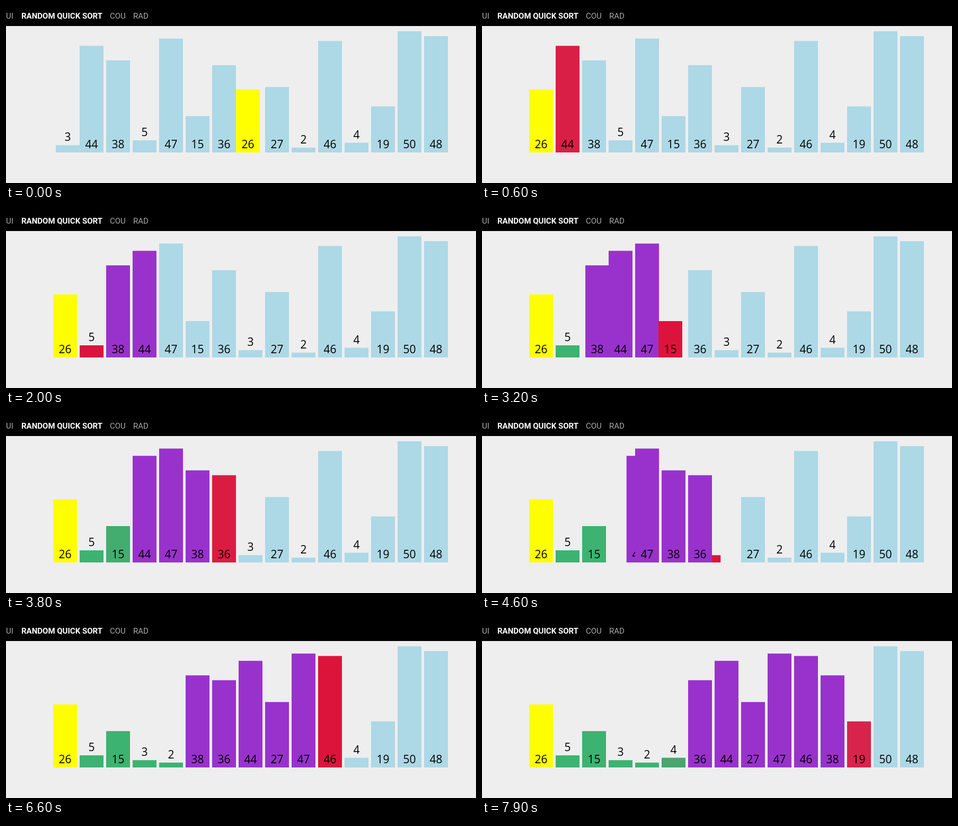
These frames come from a looping animation (887 px wide and 336 px high, 8000 ms). An HTML page:

```html
<!DOCTYPE html>
<html lang="en">
<head>
<meta charset="utf-8">
<title>Random quick sort</title>
<style>
  html, body { margin: 0; width: 100%; height: 100%; overflow: hidden; background: #eee; }
  svg { display: block; }
  .menu { font: 15px Roboto, sans-serif; fill: #aaa; }
  .menu .on { font-weight: bold; fill: #fff; }
  .bar { font: 21px "Open Sans", "Noto Sans", sans-serif; text-anchor: middle; }
</style>
</head>
<body>
<svg id="stage" width="887" height="336" viewBox="0 0 887 336">
  <rect width="887" height="38"/>
  <g class="menu">
    <text x="0" y="24">UI</text>
    <text x="29" y="24" class="on">RANDOM QUICK SORT</text>
    <text x="196" y="24">COU</text>
    <text x="240" y="24">RAD</text>
  </g>
</svg>
<script>
const LOOP = 8000, TICK = 100, MOVE = 250;
const LEFT = 89, PITCH = 50, WIDTH = 45, FLOOR = 278, UNIT = 4.6;
const BLUE = [173, 216, 230], YELLOW = [255, 255, 0], RED = [220, 20, 60],
      PURPLE = [153, 50, 204], GREEN = [60, 179, 113];

const values = [3, 44, 38, 5, 47, 15, 36, 26, 27, 2, 46, 4, 19, 50, 48];
const pivotSlot = 7, pivot = values[pivotSlot], lastSlot = 12;

// Start time of each step, in ms
const starts = [-38, 410, 868, 1317, 1764, 2232, 2694, 3146, 3604,
                4060, 4513, 4970, 5427, 5883, 6342, 6792, 7248, 7718];

function add(parent, name, attrs) {
  const el = document.createElementNS("http://www.w3.org/2000/svg", name);
  for (const key in attrs) el.setAttribute(key, attrs[key]);
  return parent.appendChild(el);
}

const stage = document.getElementById("stage");
const bars = values.map(value => {
  const height = value * UNIT, top = FLOOR - height;
  const group = add(stage, "g", { class: "bar" });
  const rect = add(group, "rect", { y: top, width: WIDTH, height });
  const label = add(group, "text", { x: WIDTH / 2, y: (height < 30 ? top : FLOOR) - 8 });
  label.textContent = value;
  return { value, group, rect };
});

// Run the partition once and record what each step changes
const steps = [];
const order = bars.slice();

function swap(a, b) {
  [order[a], order[b]] = [order[b], order[a]];
  steps.push([a, b].map(i => ({ bar: order[i], key: "slot", to: [i] })));
}

swap(0, pivotSlot);
let store = 0, previous = null;
for (let i = 1; i <= lastSlot; i++) {
  const bar = order[i], small = bar.value < pivot;
  const step = [{ bar, key: "color", to: RED }];
  if (previous) {
    step.push({ bar: previous, key: "color", to: previous.value < pivot ? GREEN : PURPLE });
  }
  steps.push(step);
  if (small) swap(++store, i);
  previous = bar;
}

const ease = p => p < 0.5 ? 4 * p ** 3 : 1 - 4 * (1 - p) ** 3;
const mix = (from, to, e) => from.map((v, i) => v + (to[i] - v) * e);

function draw(t) {
  bars.forEach((bar, i) => {
    bar.slot = [i];
    bar.color = i === pivotSlot ? YELLOW : BLUE;
  });
  starts.forEach((start, k) => {
    const e = ease(Math.min(1, Math.max(0, (t - start) / MOVE)));
    for (const { bar, key, to } of steps[k]) bar[key] = mix(bar[key], to, e);
  });
  for (const { group, rect, slot, color } of bars) {
    group.setAttribute("transform", `translate(${LEFT + slot[0] * PITCH} 0)`);
    rect.setAttribute("fill", `rgb(${color.map(Math.round)})`);
  }
}

const begin = performance.now();
function frame() {
  const t = (performance.now() - begin) % LOOP;
  draw(Math.floor(t / TICK) * TICK);
  requestAnimationFrame(frame);
}
frame();
</script>
</body>
</html>
```
